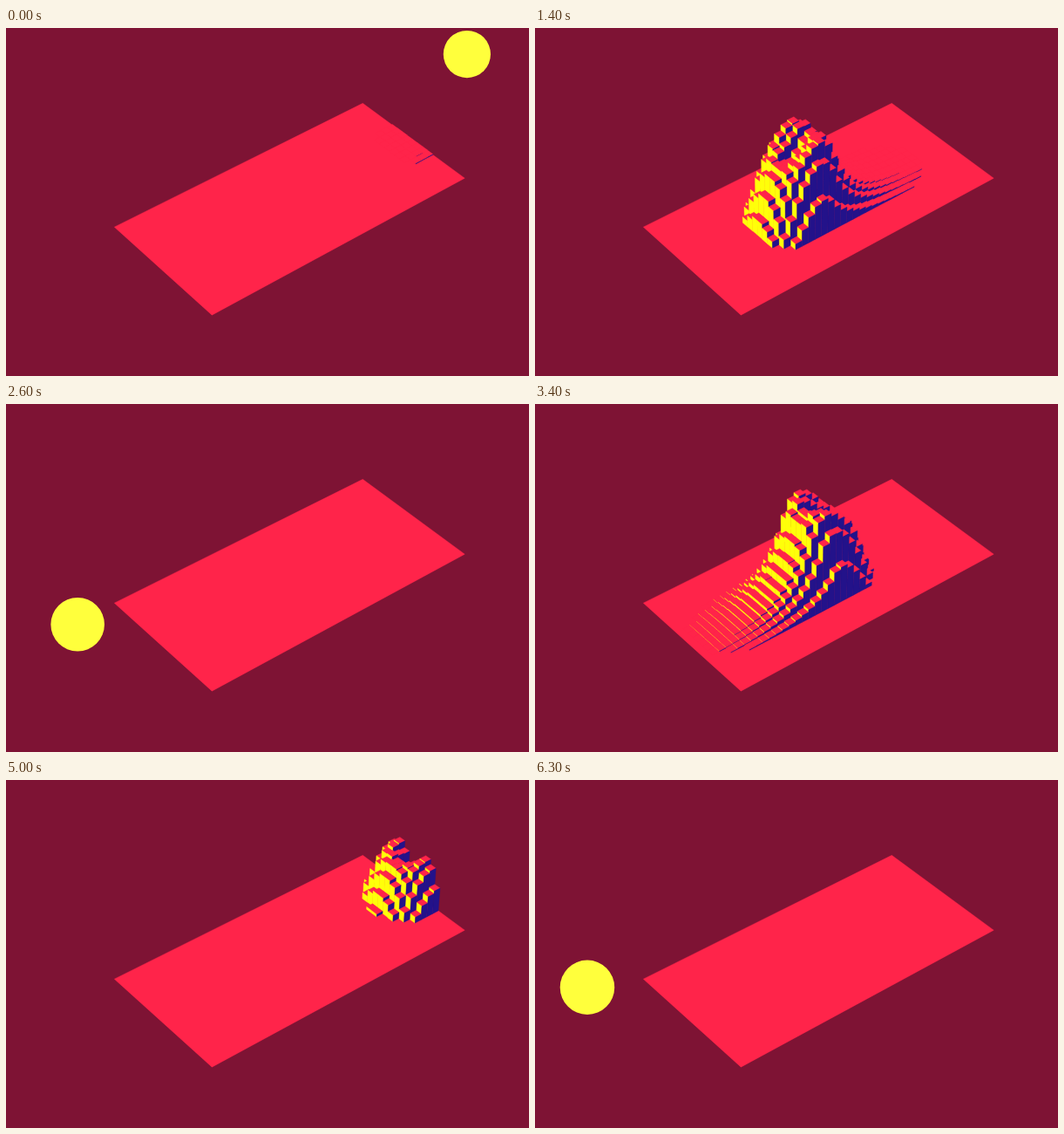
An HTML page with a canvas that plays this animation: 600 px wide and 399 px high, repeating every 6400 ms.

```html
<!DOCTYPE html>
<html lang="en">
<head>
<meta charset="utf-8">
<title>Ball under a bar field</title>
<style>
html, body { margin: 0; width: 100%; height: 100%; overflow: hidden; background: #7e1334; }
canvas { display: block; }
</style>
</head>
<body>
<canvas id="stage" width="600" height="399"></canvas>
<script>
const ctx = document.getElementById('stage').getContext('2d');
const LOOP = 6400, STEP = 100;
const COLS = 40, ROWS = 20, RADIUS = 3.06;
const SWING = 4.06, LAG = 0.033, EASE = 0.26;
const RED = '#ff244a', YELLOW = '#ffff0a', BLUE = '#23128a', BALL = '#ffff3c', BACK = '#7e1334';

// Perspective camera: x along the plate, y to its back, z up, all in cells.
const depth = (x, y, z) => 1 + 0.00205 * x + 0.0025 * y - 0.00275 * z;
function project(x, y, z) {
  const w = depth(x, y, z);
  return [(328.5 + 7.85 * x - 4.92 * y - 0.825 * z) / w,
          (199.7 - 3.3125 * x - 4.1475 * y - 7.49 * z) / w];
}

// The ball swings along the plate, lingering at the ends and dipping below in the middle.
function ballAt(t) {
  const turn = 2 * Math.PI * (t - 0.285) / SWING;
  const swing = 32.5 * Math.cos(turn - 0.06 * Math.sin(2 * turn));
  return { x: swing - 1.3, z: 0.0227 * swing * swing - 10.6 };
}

// Height a bar aims for at squared distance d2 from the ball: a dome with a dent.
function dome(d2) {
  return d2 > 30 ? 0 : 19 * (1 - (d2 / 30) ** 1.5) * (1 - 0.65 * Math.exp(-d2 / 4));
}

// How much of the ball is below the plate, 0 to 1.
const sunk = z => Math.min(1, Math.max(0, (RADIUS - z) / (2 * RADIUS)));

// Bars ease towards their aim at 60 steps a second, a little behind the ball.
function barHeights(t) {
  const path = [];
  for (let k = 36; k >= 0; k--) path.push(ballAt(t - LAG - k / 60));
  return Array.from({ length: COLS }, (_, i) =>
    Array.from({ length: ROWS }, (_, j) => {
      const x = i + 0.5 - COLS / 2, y = j + 0.5 - ROWS / 2;
      return path.reduce((h, ball) =>
        h + EASE * (sunk(ball.z) * dome((x - ball.x) ** 2 + y * y) - h), 0);
    }));
}

// The thin outline closes the seams between neighbours.
function quad(color, corners) {
  ctx.beginPath();
  for (const c of corners) ctx.lineTo(...project(...c));
  ctx.closePath();
  ctx.fillStyle = ctx.strokeStyle = color;
  ctx.lineWidth = 0.4;
  ctx.fill();
  ctx.stroke();
}

const flat = (x0, y0, x1, y1, z) => [[x0, y0, z], [x1, y0, z], [x1, y1, z], [x0, y1, z]];
const wall = (x0, y0, x1, y1, low, high) =>
  [[x0, y0, low], [x1, y1, low], [x1, y1, high], [x0, y0, high]];

function drawBars(heights) {
  for (let i = COLS - 1; i >= 0; i--) {
    for (let j = ROWS - 1; j >= 0; j--) {
      const h = heights[i][j];
      if (h < 0.07) continue;
      const x = i - COLS / 2, y = j - ROWS / 2;
      const left = i ? heights[i - 1][j] : 0;
      const front = j ? heights[i][j - 1] : 0;
      quad(RED, flat(x, y, x + 1, y + 1, h));
      if (h - left > 0.03) quad(YELLOW, wall(x, y, x, y + 1, left, h));
      if (h - front > 0.03) quad(BLUE, wall(x, y, x + 1, y, front, h));
    }
  }
}

function draw(t) {
  ctx.fillStyle = BACK;
  ctx.fillRect(0, 0, 600, 399);
  const ball = ballAt(t);
  if (Math.abs(ball.x) > COLS / 2) {
    ctx.fillStyle = BALL;
    ctx.beginPath();
    ctx.arc(...project(ball.x, 0, ball.z), 9.14 * RADIUS / depth(ball.x, 0, ball.z), 0, 2 * Math.PI);
    ctx.fill();
  }
  quad(RED, flat(-COLS / 2, -ROWS / 2, COLS / 2, ROWS / 2, 0));
  drawBars(barHeights(t));
}

const start = performance.now();
let shown = -1;
function tick() {
  const now = Math.floor((performance.now() - start) % LOOP / STEP) * STEP;
  if (now !== shown) draw((shown = now) / 1000);
  requestAnimationFrame(tick);
}
tick();
</script>
</body>
</html>
```
